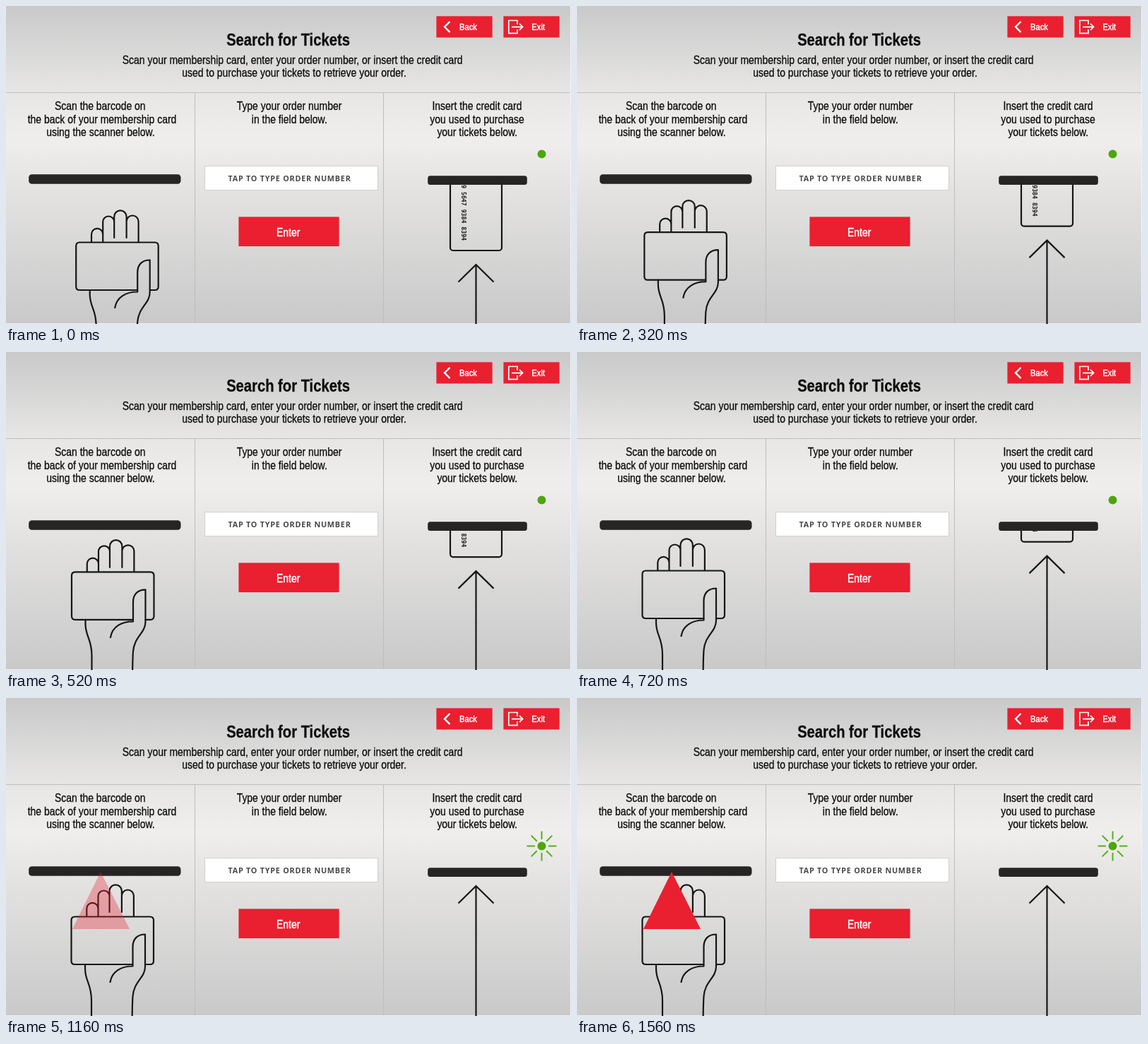
Animation, 800 px wide and 450 px high, one loop 3840 ms. Source, as an HTML page:

```html
<!DOCTYPE html>
<html lang="en">
<head>
<meta charset="utf-8">
<title>Search for Tickets</title>
<style>
  html, body { margin: 0; width: 100%; height: 100%; overflow: hidden; }
  svg { display: block; width: 100vw; height: 100vh; }
  text { text-anchor: middle; }
  .label { font-family: "Liberation Sans", Arial, sans-serif; }
  .field { font: 700 10.8px "Open Sans", sans-serif; letter-spacing: .76px; fill: #474747; }
  .digits { font: bold 8.2px "DejaVu Sans Mono", monospace; text-anchor: end; fill: #1a1a1a; }
  .line { fill: none; stroke: #161616; stroke-width: 2.2; stroke-linecap: round; stroke-linejoin: round; }
  .arrow { stroke-linecap: butt; stroke-linejoin: miter; }
  .icon { fill: none; stroke: #fff; stroke-width: 1.7; }
  .chevron { stroke-width: 2.4; }
  .red { fill: #ea1f2f; }
  .bar { fill: #272425; }
</style>
</head>
<body>
<svg viewBox="0 0 800 450" xmlns="http://www.w3.org/2000/svg">
  <defs>
    <linearGradient id="metal" x2="0" y2="1">
      <stop offset="0" stop-color="#c9c9c9"/>
      <stop offset=".27" stop-color="#e7e6e5"/>
      <stop offset=".42" stop-color="#f0eeed"/>
      <stop offset=".6" stop-color="#e2e1e0"/>
      <stop offset="1" stop-color="#c9c9c9"/>
    </linearGradient>
    <clipPath id="belowSlot"><rect x="590" y="250" width="160" height="200"/></clipPath>
  </defs>

  <rect width="800" height="450" fill="url(#metal)"/>
  <path d="M0 122.5H799M267.5 122V449M534.5 122V449" stroke="#bdbdbd" fill="none"/>
  <path d="M0 449.5H799.5V0" stroke="#f3f3f3" fill="none"/>

  <rect class="red" x="609.4" y="14.4" width="79.2" height="30.2"/>
  <path class="icon chevron" d="M628.5 22L621 29.6L628.5 37.2"/>
  <rect class="red" x="704.4" y="14.4" width="79.2" height="30.2"/>
  <path class="icon" d="M724 26V20.5H711.8V38.7H724V33M716 29.6H731M727 25L731.6 29.6L727 34.2"/>

  <rect x="281.5" y="226.5" width="245" height="34" fill="#fff" stroke="#cfcfcf"/>
  <text class="field" x="401.5" y="248.3">TAP TO TYPE ORDER NUMBER</text>
  <rect class="red" x="329.4" y="298.4" width="142.2" height="41.6"/>
  <g id="labels"></g>

  <g id="hand" class="line">
    <path d="M197 377H204Q209 377 209 372V314.5Q209 309.5 204 309.5H97.5Q92.5 309.5 92.5 314.5V372Q92.5 377 97.5 377H179"/>
    <path d="M114.3 309V298a8 8 0 0 1 16.2 0M130.5 309V280.5a8 8 0 0 1 16 0M146.5 303V273a8.7 8.7 0 0 1 17.4 0V303M163.9 280a8.4 8.4 0 0 1 17 0V309"/>
    <path d="M147.5 402C150 387 163 379.5 179.5 379.5V352C179.5 341 186 334.5 197 334.5V380C197 396 181 401 179.5 422C178.8 432 178.5 440 178.5 480"/>
    <path d="M112 377V383C112 401 121 404 121 428V480"/>
  </g>
  <rect class="bar" x="32.2" y="238.3" width="215.3" height="13.5" rx="4.5"/>
  <path id="beam" class="red" d="M134 246L175 327H94Z"/>

  <g clip-path="url(#belowSlot)">
    <g id="card">
      <rect class="line" x="629" y="120" width="73" height="226" rx="4"/>
      <text class="digits" transform="translate(645.3 332) rotate(90)">9 5647 9384 8394</text>
    </g>
  </g>
  <path id="arrow" class="line arrow" d="M640.5 390.5L665.5 366L690.5 390.5M665.5 366V560"/>
  <rect class="bar" x="597.2" y="240.2" width="140.6" height="12.7" rx="3.5"/>
  <circle cx="758.5" cy="209.5" r="6" fill="#4ea60c"/>
  <g id="rays" stroke="#4fb01a" stroke-width="2"></g>
</svg>
<script>
const LOOP = 3840, STEP = 40, CONDENSE = 0.825;
const $ = id => document.getElementById(id);
const clamp = (v, lo, hi) => Math.min(hi, Math.max(lo, v));

function add(parent, tag, attrs, content = '') {
  const el = document.createElementNS('http://www.w3.org/2000/svg', tag);
  for (const key in attrs) el.setAttribute(key, attrs[key]);
  el.textContent = content;
  parent.append(el);
}

// All interface labels share one condensed face.
function label(content, x, y, size = 16.9, color = '#0c0c0c', weight = 400, stroke = 0.3) {
  add($('labels'), 'text', {
    class: 'label', transform: `translate(${x} ${y}) scale(${CONDENSE} 1)`,
    'font-size': size, 'font-weight': weight, fill: color, stroke: color, 'stroke-width': stroke
  }, content);
}

label('Search for Tickets', 399.5, 56, 24.5, '#0c0c0c', 700, 0.3);
label('Scan your membership card, enter your order number, or insert the credit card', 405.7, 81.5);
label('used to purchase your tickets to retrieve your order.', 408, 100.3);
label('Scan the barcode on', 133.3, 147);
label('the back of your membership card', 136, 165.7);
label('using the scanner below.', 134, 184.4);
label('Type your order number', 401, 147);
label('in the field below.', 401.3, 165.7);
label('Insert the credit card', 667, 147);
label('you used to purchase', 667, 165.7);
label('your tickets below.', 667.3, 184.4);
label('Back', 654.5, 34.3, 13.6, '#fff', 400, 0.5);
label('Exit', 753.7, 34.3, 13.6, '#fff', 400, 0.5);
label('Enter', 399.7, 326.3, 16.9, '#fff', 400, 0.5);

for (let i = 0; i < 8; i++) {
  add($('rays'), 'path', { d: 'M9.5 0H21', transform: `translate(758.5 209.5) rotate(${i * 45})` });
}

function render(time) {
  const t = Math.floor((time % LOOP) / STEP) * STEP;
  const lift = 1 - clamp(t / 560, 0, 1);
  const push = clamp(t * 0.1075, 0, 100);
  $('hand').setAttribute('transform', `translate(${6.7 * lift} ${25 * lift})`);
  $('card').setAttribute('transform', `translate(0 ${-push})`);
  $('arrow').setAttribute('transform', `translate(0 ${-push})`);
  $('rays').setAttribute('visibility', t >= 960 ? 'visible' : 'hidden');
  $('beam').setAttribute('opacity', clamp((t - 1080) / 240, 0, 1));
}

const start = performance.now();
function tick() {
  render(performance.now() - start);
  requestAnimationFrame(tick);
}
tick();
</script>
</body>
</html>
```
